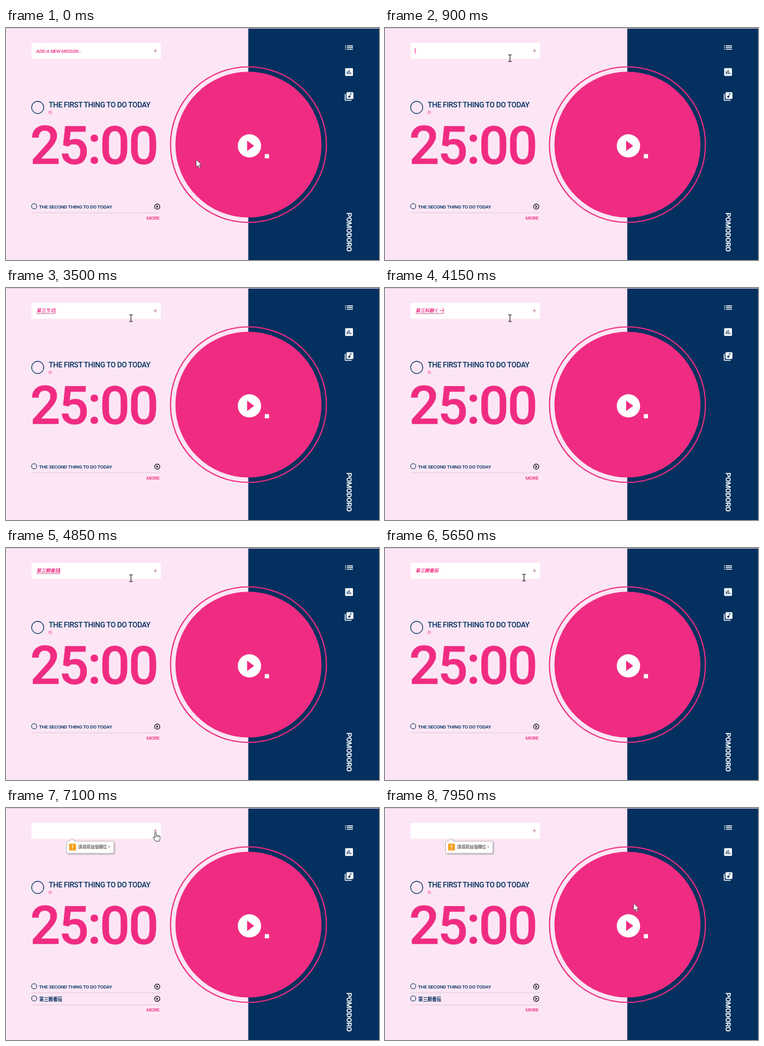
Write an HTML page that moves like this. It is 600x374 px and loops after 8000 ms.

```html
<!DOCTYPE html>
<html lang="zh-Hant">
<head>
<meta charset="utf-8">
<title>Pomodoro</title>
<style>
html, body { margin: 0; width: 100%; height: 100%; overflow: hidden; background: #fce6f5; }
svg { display: block; width: 600px; height: 374px; }
text { font-family: Roboto, "Noto Sans CJK TC", "Noto Sans CJK", sans-serif; font-weight: 500; font-size: 7.95px; letter-spacing: -.03em; fill: #03305f; }
.pink { fill: #f02b82; }
.head { font-size: 12px; }
.side { font-size: 11.8px; fill: #fff; stroke: #fff; stroke-width: .25; }
.clock { font-size: 85.5px; stroke: #f02b82; stroke-width: .5; }
.field { font-style: italic; fill: #f02b82; }
.cjk { font-size: 7.42px; font-weight: 700; letter-spacing: 0; }
.warn { font-size: 6.7px; font-weight: 400; letter-spacing: 0; fill: #222; }
</style>
</head>
<body>
<svg viewBox="0 0 600 374" xmlns="http://www.w3.org/2000/svg">
  <defs>
    <g id="row">
      <circle cx="45.3" cy="0" r="4.1" fill="none" stroke="#03305f"/>
      <circle cx="243.3" cy=".6" r="4.1" fill="none" stroke="#111" stroke-width="1.2"/>
      <path d="M242 -1.6v4.4l3.1-2.2z" fill="#111"/>
      <path d="M41 10.5h208" stroke="#e0cbda"/>
    </g>
    <filter id="shadow" x="-20%" y="-40%" width="140%" height="200%">
      <feDropShadow dx="1" dy="1.2" stdDeviation="1" flood-opacity=".35"/>
    </filter>
  </defs>

  <rect width="600" height="374" fill="#fce6f5"/>
  <rect x="389.7" width="210.3" height="374" fill="#03305f"/>
  <rect width="600" height="1" fill="#d8c3d1"/>
  <rect width="1" height="374" fill="#fff" opacity=".4"/>

  <circle cx="390" cy="188" r="125.4" fill="none" stroke="#f02b82" stroke-width="1.9"/>
  <circle cx="390" cy="188" r="117.5" class="pink"/>
  <circle cx="391.6" cy="190" r="18.8" fill="#fff"/>
  <path d="M387.8 181.4v17.2l11.4-8.6z" class="pink"/>
  <rect x="416.3" y="203.3" width="6.8" height="6.8" fill="#fff"/>

  <g fill="#fff">
    <path transform="translate(543.5 23.2) scale(.695)" d="M3 13h2v-2H3v2zm0 4h2v-2H3v2zm0-8h2V7H3v2zm4 4h14v-2H7v2zm0 4h14v-2H7v2zM7 7v2h14V7H7z"/>
    <path transform="translate(543.5 62.7) scale(.695)" d="M19 3H5c-1.1 0-2 .9-2 2v14c0 1.1.9 2 2 2h14c1.1 0 2-.9 2-2V5c0-1.1-.9-2-2-2zM9 17H7v-7h2v7zm4 0h-2V7h2v10zm4 0h-2v-4h2v4z"/>
    <path transform="translate(543.5 102) scale(.695)" d="M20 2H8c-1.1 0-2 .9-2 2v12c0 1.1.9 2 2 2h12c1.1 0 2-.9 2-2V4c0-1.1-.9-2-2-2zm-2 5h-3v5.5c0 1.38-1.12 2.5-2.5 2.5S10 13.88 10 12.5s1.12-2.5 2.5-2.5c.57 0 1.08.19 1.5.51V5h4v2zM4 6H2v14c0 1.1.9 2 2 2h14v-2H4V6z"/>
  </g>
  <text class="side" transform="translate(547.5 297.6) rotate(90)">POMODORO</text>

  <rect x="41" y="24" width="208" height="25.5" fill="#fff"/>
  <path d="M237.5 36.7h5.6M240.3 33.9v5.6" stroke="#b8709c" stroke-width=".9"/>
  <text id="hint" class="field" x="48.6" y="39.8">ADD A NEW MISSON...</text>
  <text id="typed" class="field cjk" x="49" y="39.4"></text>
  <path id="underline" stroke="#b0407c" stroke-width=".8"/>
  <path id="caret" stroke="#f02b82"/>

  <circle cx="51" cy="128" r="9.8" fill="none" stroke="#03305f" stroke-width="1.2"/>
  <text class="head" x="68.8" y="128.4">THE FIRST THING TO DO TODAY</text>
  <circle cx="71.2" cy="136" r="2.1" fill="none" stroke="#f02b82" stroke-width=".8"/>
  <text class="pink clock" x="38.7" y="218.5">25:00</text>

  <use href="#row" y="287.4"/>
  <text x="53" y="290.5">THE SECOND THING TO DO TODAY</text>
  <g id="added">
    <use href="#row" y="307"/>
    <text class="cjk" x="53.5" y="310.6">第三顆番茄</text>
  </g>
  <text id="more" class="pink" x="246.8" text-anchor="end">MORE</text>

  <g id="tip">
    <path d="M99.5 53.5H102L106 49l4 4.5H171.5q2 0 2 2V71q0 2-2 2H99.5q-2 0-2-2V55.5q0-2 2-2z" fill="#fff" stroke="#aaa" stroke-width=".7" filter="url(#shadow)"/>
    <rect x="101.5" y="57.5" width="11" height="11" rx=".8" fill="#f5a01d"/>
    <path d="M107 59.5v4.6M107 65.4v1.4" stroke="#fff" stroke-width="1.4"/>
    <text class="warn" x="116" y="65.4">請填寫這個欄位。</text>
  </g>

  <g id="arrow"><path transform="scale(1.08)" d="M0 0V11.2L2.6 8.9 4.3 12.9 6.1 12.1 4.4 8.2H7.9z" fill="#fff" stroke="#222" stroke-width=".6"/></g>
  <g id="beam"><path d="M-2.9 -5.3H-1Q0 -5.3 0 -4.3Q0 -5.3 1 -5.3H2.9M0 -4.3V4.5M-2.9 5.5H-1Q0 5.5 0 4.5Q0 5.5 1 5.5H2.9" fill="none" stroke="#222" stroke-width="1.1"/></g>
  <g id="hand">
    <path d="M-1 .6Q0 -.6 1.2 .6V5.5Q2.3 4.6 3.3 5.7Q4.4 5 5.3 6.2Q6.7 5.7 7.3 7.2V10.5L6 14.5H0L-3.7 9.2Q-3.7 7.4 -2.1 8L-1 9.2z" fill="#fff" stroke="#222" stroke-width=".8"/>
    <path d="M1.2 5.5v2.3M3.3 5.7v2.3M5.3 6.2v2" stroke="#222" stroke-width=".7"/>
  </g>
</svg>
<script>
const LOOP = 8000, EM = 7.42;
const FOCUS = 750, TYPE = 2550, KEY = 120, COMMIT = 4900, ADD = 5900, WARN = 6300;
const el = id => document.getElementById(id);
const show = (id, on) => el(id).style.display = on ? '' : 'none';

// Composition text after each key press
const keys = 'ㄉ,ㄉㄧ,第,第ㄙ,第ㄙㄢ,第三,第三ㄎ,第三ㄎㄜ,第三科,第三科ㄈ,第三科ㄈㄢ,第三科翻,第三科翻ㄑ,第三科翻ㄑㄧ,第三科翻ㄑㄧㄝ,第三顆番茄'.split(',');

// Pointer path: time, x, y
const path = [
  [50, 306, 212], [650, 201, 48.5], [5400, 201, 48.5], [5650, 223.6, 47.5],
  [5880, 240.5, 39], [7300, 240.5, 39], [7850, 400, 153.5]
];

function pointer(t) {
  const i = path.findIndex(p => p[0] > t);
  if (i === 0) return path[0].slice(1);
  if (i < 0) return path[path.length - 1].slice(1);
  const [a, b] = [path[i - 1], path[i]];
  const u = (t - a[0]) / (b[0] - a[0]), e = u * u * (3 - 2 * u);
  return [1, 2].map(k => a[k] + (b[k] - a[k]) * e);
}

function render(t) {
  const [x, y] = pointer(t);
  const inField = x > 41 && x < 249 && y > 24 && y < 50;
  const shape = !inField ? 'arrow' : x > 234 ? 'hand' : 'beam';
  for (const id of ['arrow', 'beam', 'hand']) show(id, id === shape);
  el(shape).setAttribute('transform', `translate(${x} ${y})`);

  const typing = t >= TYPE && t < ADD;
  const composing = typing && t < COMMIT;
  const step = Math.min(keys.length - 1, Math.floor((t - TYPE) / KEY));
  const word = typing ? keys[step] : '';
  const end = 49 + word.length * EM;
  el('typed').textContent = word;
  el('underline').setAttribute('d', `M49 41.2H${end}`);
  show('underline', composing);

  const focused = (t >= FOCUS && t < ADD) || t >= WARN;
  const since = t >= WARN ? WARN : t >= COMMIT ? COMMIT : FOCUS;
  const lit = composing || Math.floor((t - since) / 500) % 2 === 0;
  el('caret').setAttribute('d', `M${word ? end + .3 : 48.5} 32.3v8.8`);
  show('caret', focused && lit);
  show('hint', !focused);

  const added = t >= ADD;
  show('added', added);
  el('more').setAttribute('y', added ? 328 : 308.5);
  show('tip', t >= WARN);
}

function tick(now) {
  render(now % LOOP);
  requestAnimationFrame(tick);
}
render(0);
requestAnimationFrame(tick);
</script>
</body>
</html>
```
